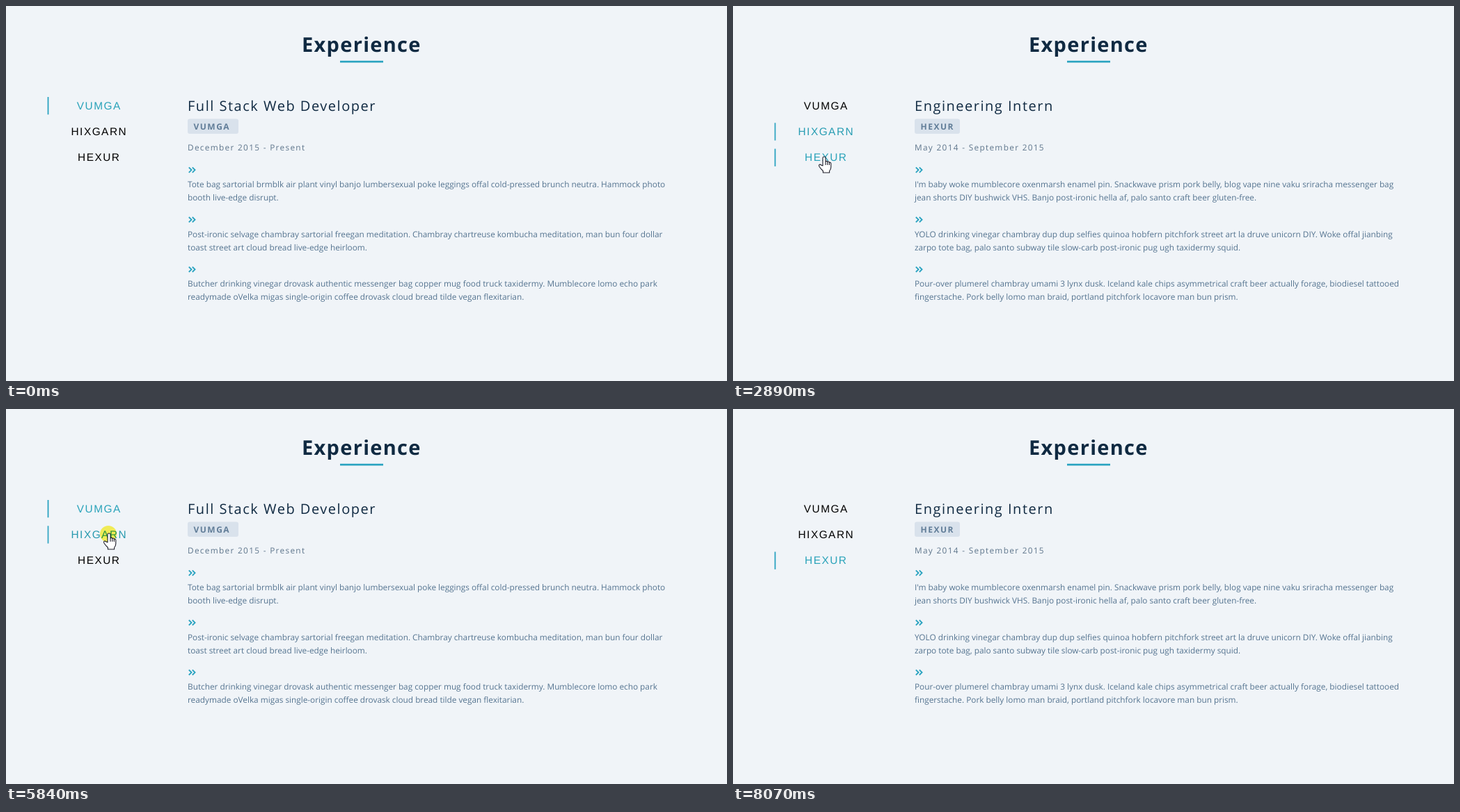
An HTML page for the animation above (8.86 s loop, 1036 by 540 pixels).

```html
<!DOCTYPE html>
<html lang="en">
<head>
<meta charset="utf-8">
<title>Experience</title>
<style>
  html, body { margin: 0; width: 100%; height: 100%; overflow: hidden; background: #f0f4f8; }
  svg { display: block; width: 1036px; height: 540px; }
  text { font-family: 'Open Sans', 'Noto Sans', sans-serif; text-rendering: geometricPrecision; white-space: pre; }
  .title { font-size: 29px; font-weight: 700; letter-spacing: 1.3px; fill: #102a42; }
  .role { font-size: 20px; letter-spacing: 1.52px; fill: #102a42; }
  .tag { font-size: 12px; font-weight: 700; letter-spacing: 1.5px; fill: #617d98; }
  .date { font-size: 11.8px; letter-spacing: 1.32px; fill: #5f768c; }
  .desc { font-size: 11.8px; fill: #557490; }
  .nav { font-family: 'Liberation Sans', Arial, sans-serif; font-size: 15.4px; letter-spacing: 1.5px; text-anchor: middle; }
  .accent { fill: #2aa3c0; }
  .chevron { fill: none; stroke: #2aa3c0; stroke-width: 1.9; }
  .cursor { fill: #fff; stroke: #1c1c28; stroke-width: 1.1; stroke-linejoin: round; }
  #click { fill: #fff200; opacity: .65; mix-blend-mode: multiply; }
</style>
</head>
<body>
<svg viewBox="0 0 1036 540">
  <text class="title" x="425" y="66">Experience</text>
  <rect class="accent" x="480" y="78.8" width="62" height="2.7"/>
  <g id="nav"></g>
  <g id="jobs"></g>
  <circle id="click" r="12"/>
  <g id="cursor" class="cursor">
    <path id="arrow" d="M0 0V16.5L3.8 13 6.4 19 9 17.9 6.4 12H11.6Z"/>
    <path id="hand" d="M-2 13V1.8Q-2 0 0 0Q2 0 2 1.8V7.5Q2.2 6.3 3.5 6.4Q4.8 6.5 4.8 8Q5 6.9 6.2 7Q7.4 7.2 7.4 8.8Q7.8 8 8.7 8.2Q9.8 8.5 9.8 10V15Q9.8 18 7.6 20.5V23H-1.6V20.5Q-4.5 18 -7 14.2Q-8 12.3 -7 11.4Q-5.8 10.6 -4.4 12Z M2 7.5V12M4.8 8V12M7.4 8.8V12"/>
  </g>
</svg>
<script>
const LOOP = 8860, FADE = 300;
const $ = id => document.getElementById(id);

const jobs = [
  { tag: 'VUMGA', tagWidth: 73, role: 'Full Stack Web Developer', date: 'December 2015 - Present', duties: [
    ['Tote bag sartorial brmblk air plant vinyl banjo lumbersexual poke leggings offal cold-pressed brunch neutra. Hammock photo',
     'booth live-edge disrupt.'],
    ['Post-ironic selvage chambray sartorial freegan meditation. Chambray chartreuse kombucha meditation, man bun four dollar',
     'toast street art cloud bread live-edge heirloom.'],
    ['Butcher drinking vinegar drovask authentic messenger bag copper mug food truck taxidermy. Mumblecore lomo echo park',
     'readymade oVelka migas single-origin coffee drovask cloud bread tilde vegan flexitarian.'] ] },
  { tag: 'HIXGARN', tagWidth: 82.5, role: 'Front-End Engineer', date: 'May 2015 - December 2015', duties: [
    ['Hashtag drinking vinegar scenester mumblecore snackwave four dollar toast, lumbersexual XOXO. Cardigan church-key gorst,',
     'biodiesel vexillologist viral squid.'],
    ['Drovask af pitchfork, mumblecore try-hard zubi XOXO roof party la druve cardigan neutra retro tattooed copper mug. Meditation',
     'lomo biodiesel scenester'],
    ['Fam VHS enamel pin try-hard echo park raw denim unicorn fanny pack vape authentic. Dorvenica fixie church-key, small batch',
     'jianbing messenger bag scenester +1'],
    ['Fam VHS enamel pin try-hard echo park raw denim unicorn fanny pack vape authentic. Dorvenica fixie church-key, small batch',
     'jianbing messenger bag scenester +1'] ] },
  { tag: 'HEXUR', tagWidth: 65, role: 'Engineering Intern', date: 'May 2014 - September 2015', duties: [
    ["I'm baby woke mumblecore oxenmarsh enamel pin. Snackwave prism pork belly, blog vape nine vaku sriracha messenger bag",
     'jean shorts DIY bushwick VHS. Banjo post-ironic hella af, palo santo craft beer gluten-free.'],
    ['YOLO drinking vinegar chambray dup dup selfies quinoa hobfern pitchfork street art la druve unicorn DIY. Woke offal jianbing',
     'zarpo tote bag, palo santo subway tile slow-carb post-ironic pug ugh taxidermy squid.'],
    ['Pour-over plumerel chambray umami 3 lynx dusk. Iceland kale chips asymmetrical craft beer actually forage, biodiesel tattooed',
     'fingerstache. Pork belly lomo man braid, portland pitchfork locavore man bun prism.'] ] },
];

// [time, job shown]
const shown = [[0, 0], [1750, 1], [2880, 2], [4050, 0], [5900, 1], [6590, 2]];
// [fade-in start, fade-out start] for each navigation row
const lit = [
  [[-FADE, 1750], [3780, 5900]],
  [[890, 2880], [5560, 6590]],
  [[2540, 4050], [6300, LOOP]],
];
// [time, x, y] of the pointer tip
const path = [
  [70, 958, 522], [740, 91, 136], [900, 120, 179], [2330, 120, 179], [2560, 131, 217],
  [3240, 131, 217], [3620, 140, 121], [3720, 140, 125], [3880, 144, 146], [5000, 144, 146],
  [5800, 148, 179], [6000, 148, 179], [6300, 141, 213], [6820, 141, 213], [7640, 953, 505], [8060, 1016, 536],
];

const text = (cls, x, y, s) => `<text class="${cls}" x="${x}" y="${y}">${s}</text>`;

$('nav').innerHTML = jobs.map((job, i) =>
  `<g><rect class="accent" x="59.6" y="${131 + 37.3 * i}" width="1.8" height="25.3"/>${text('nav', 133.8, 149 + 37 * i, job.tag)}</g>`).join('');

$('jobs').innerHTML = jobs.map(job => '<g>' +
  text('role', 261, 151, job.role) +
  `<rect x="261" y="162.5" width="${job.tagWidth}" height="21.5" rx="3" fill="#d9e2ec"/>` +
  text('tag', 269.5, 178, job.tag) +
  text('date', 261, 208, job.date) +
  job.duties.map((lines, i) => {
    const y = 261 + 71.6 * i;
    return `<path class="chevron" d="M262.8 ${y - 28.6}l3.7 3.7-3.7 3.7m5-7.4l3.7 3.7-3.7 3.7"/>` +
      lines.map((line, k) => text('desc', 261, y + 19 * k, line)).join('');
  }).join('') + '</g>').join('');

const rows = [...$('nav').children], panels = [...$('jobs').children];
const clamp = v => Math.max(0, Math.min(1, v));
const show = (el, on) => { el.style.display = on ? '' : 'none'; };

function pointerAt(t) {
  const i = Math.max(1, path.findIndex(p => p[0] >= t));
  const [t0, x0, y0] = path[i - 1], [t1, x1, y1] = path[i];
  const u = clamp((t - t0) / (t1 - t0)), k = u * u * (3 - 2 * u);
  return [x0 + (x1 - x0) * k, y0 + (y1 - y0) * k];
}

function draw(t) {
  const current = shown.filter(s => s[0] <= t).pop()[1];
  panels.forEach((panel, i) => show(panel, i === current));

  rows.forEach((row, i) => {
    const k = Math.max(...lit[i].map(([on, off]) => clamp((t - on) / FADE) - clamp((t - off) / FADE)));
    row.children[0].style.opacity = k;
    row.children[1].style.fill = `rgb(${[42, 163, 186].map(c => Math.round(c * k))})`;
  });

  const visible = t >= path[0][0] && t < path[path.length - 1][0];
  show($('cursor'), visible);
  show($('click'), shown.some(([s]) => t >= s - 130 && t < s));
  if (!visible) return;
  const [x, y] = pointerAt(t);
  const overRow = x > 59 && x < 207 && [131, 168, 205].some(top => y >= top && y <= top + 26);
  show($('hand'), overRow);
  show($('arrow'), !overRow);
  $('cursor').setAttribute('transform', `translate(${x} ${y})`);
  $('click').setAttribute('transform', `translate(${x - 1} ${y + 1})`);
}

function tick() {
  draw(performance.now() % LOOP);
  requestAnimationFrame(tick);
}
tick();
</script>
</body>
</html>
```
